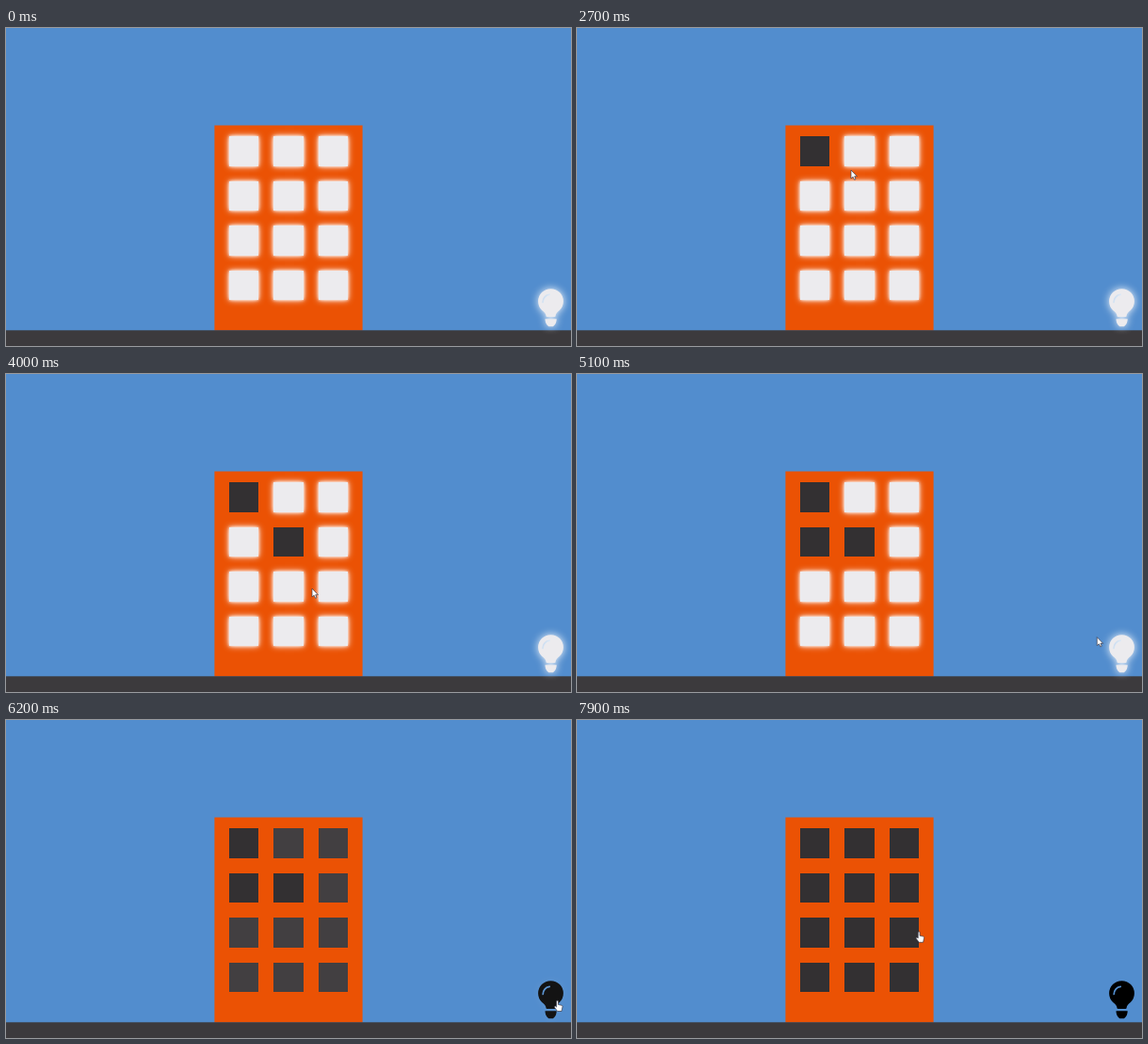
An HTML page with a canvas that plays this animation: 600x338 px, repeating every 8000 ms.

```html
<!DOCTYPE html>
<html lang="en">
<head>
<meta charset="utf-8">
<title>Lights out</title>
<style>
  html, body { margin: 0; width: 100%; height: 100%; overflow: hidden; background: #528dce; }
  canvas { display: block; width: 100vw; height: 100vh; }
</style>
</head>
<body>
<canvas id="stage" width="600" height="338"></canvas>
<script>
const ctx = document.getElementById('stage').getContext('2d');
const LOOP = 8000, STEP = 100;
const LIT = [236, 235, 238], DARK = [51, 48, 50], BLACK = [0, 0, 0];
const SIZE = 31.6, PITCH = 47.4;
const BULB_OFF = 5860, BULB_FADE = 500;

// Window index -> time it is clicked off
const clicks = { 0: 2600, 4: 3000, 3: 4800 };

// The pointer glides to each stop and rests there
const APPEARS = 1400;
const entry = { x: 470, y: 285 };
const stops = [
  { from: 1400, to: 2400, x: 262, y: 143 },
  { from: 2500, to: 2700, x: 291, y: 151 },
  { from: 2700, to: 2900, x: 300, y: 176 },
  { from: 3000, to: 3500, x: 325, y: 228 },
  { from: 4000, to: 4600, x: 256, y: 190 },
  { from: 4800, to: 5260, x: 593, y: 292 },
  { from: 5600, to: 5900, x: 585.5, y: 298 },
  { from: 6600, to: 6800, x: 584.5, y: 294.5 },
  { from: 7300, to: 7900, x: 363.1, y: 224.8 }
];

const arrow = new Path2D('M0 0V9L2.1 7.2 3.6 10.3 5 9.6 3.7 6.7H6.4Z');
const hand = new Path2D('M-.9 7V1.1a.95.95 0 0 1 1.9 0V4.5L4.6 5.3Q5.6 5.6 5.5 6.7L4.5 11.5H.1L-3 7.4Q-3.2 6-2 6.1L-.9 7.1Z');

const clamp = v => Math.max(0, Math.min(1, v));
const easeOut = (p, power = 2) => 1 - (1 - clamp(p)) ** power;
const lerp = (a, b, p) => a + (b - a) * p;
const mix = (a, b, p) => `rgb(${a.map((v, i) => Math.round(lerp(v, b[i], p)))})`;

function pointerAt(t) {
  let { x, y } = entry;
  for (const s of stops) {
    const p = easeOut((t - s.from) / (s.to - s.from));
    x = lerp(x, s.x, p);
    y = lerp(y, s.y, p);
  }
  return { x, y };
}

// Window box with its edges snapped to whole pixels
function windowBox(i) {
  const x = 236.8 + (i % 3) * PITCH;
  const y = 115.3 + Math.floor(i / 3) * PITCH;
  const left = Math.round(x), top = Math.round(y);
  return { left, top, w: Math.round(x + SIZE) - left, h: Math.round(y + SIZE) - top };
}

function setGlow(alpha, blur) {
  ctx.shadowColor = `rgba(255,255,255,${alpha})`;
  ctx.shadowBlur = alpha > 0 ? blur : 0;
}

function drawWindow(i, t, fade) {
  const { left, top, w, h } = windowBox(i);
  const p = t >= clicks[i] ? 1 : fade;
  ctx.save();
  ctx.fillStyle = mix(LIT, DARK, p);
  for (const blur of [7, 3]) {
    setGlow((1 - p) ** 2, blur);
    ctx.fillRect(left, top, w, h);
  }
  ctx.restore();
}

// Bulb is built on its own layer so the shine stays see-through
const layer = document.createElement('canvas');
layer.width = layer.height = 60;
const bulb = layer.getContext('2d');
const glass = new Path2D('M23.5 36Q23.3 33 19.1 30.1A13.4 13.4 0 1 1 37.9 30.1Q33.8 33 33.6 36Q33.5 37 32.5 37H24.6Q23.6 37 23.5 36Z');
const cap = new Path2D('M22.5 39.3H34.7Q34.8 44 31.5 46.8Q31 47.3 30 47.3H27.2Q26.2 47.3 25.7 46.8Q22.4 44 22.5 39.3Z');
const shine = new Path2D('M20.2 21.5Q20.6 14.5 27.2 13.3');

function drawBulb(fade) {
  bulb.clearRect(0, 0, 60, 60);
  bulb.globalCompositeOperation = 'source-over';
  bulb.fillStyle = mix(LIT, BLACK, fade);
  bulb.fill(glass);
  bulb.fill(cap);
  bulb.globalCompositeOperation = 'destination-out';
  bulb.lineWidth = 1.7;
  bulb.lineCap = 'round';
  bulb.stroke(shine);
  ctx.save();
  setGlow(1 - fade, 9);
  ctx.drawImage(layer, 550, 270);
  ctx.restore();
}

function overTarget(x, y) {
  if (x > 565 && x < 592 && y > 277 && y < 318) return true;
  for (let i = 0; i < 12; i++) {
    const { left, top, w, h } = windowBox(i);
    if (x >= left && x <= left + w + 0.2 && y >= top && y <= top + h) return true;
  }
  return false;
}

function drawPointer(t) {
  if (t < APPEARS) return;
  const { x, y } = pointerAt(t);
  const shape = overTarget(x, y) ? hand : arrow;
  ctx.save();
  ctx.translate(x, y);
  ctx.fillStyle = '#fff';
  ctx.strokeStyle = '#3a3a48';
  ctx.lineWidth = 0.7;
  ctx.lineJoin = 'round';
  ctx.fill(shape);
  ctx.stroke(shape);
  ctx.restore();
}

function draw(t) {
  const fade = easeOut((t - BULB_OFF) / BULB_FADE, 2.2);
  ctx.fillStyle = '#528dce';
  ctx.fillRect(0, 0, 600, 338);
  ctx.fillStyle = '#eb5204';
  ctx.fillRect(221.4, 103.5, 157.2, 218);
  ctx.fillStyle = '#3c3a3d';
  ctx.fillRect(0, 321.3, 600, 17);
  for (let i = 0; i < 12; i++) drawWindow(i, t, fade);
  drawBulb(fade);
  drawPointer(t);
}

const start = performance.now();
function tick() {
  const t = (performance.now() - start) % LOOP;
  draw(Math.floor(t / STEP) * STEP);
  requestAnimationFrame(tick);
}
tick();
</script>
</body>
</html>
```
